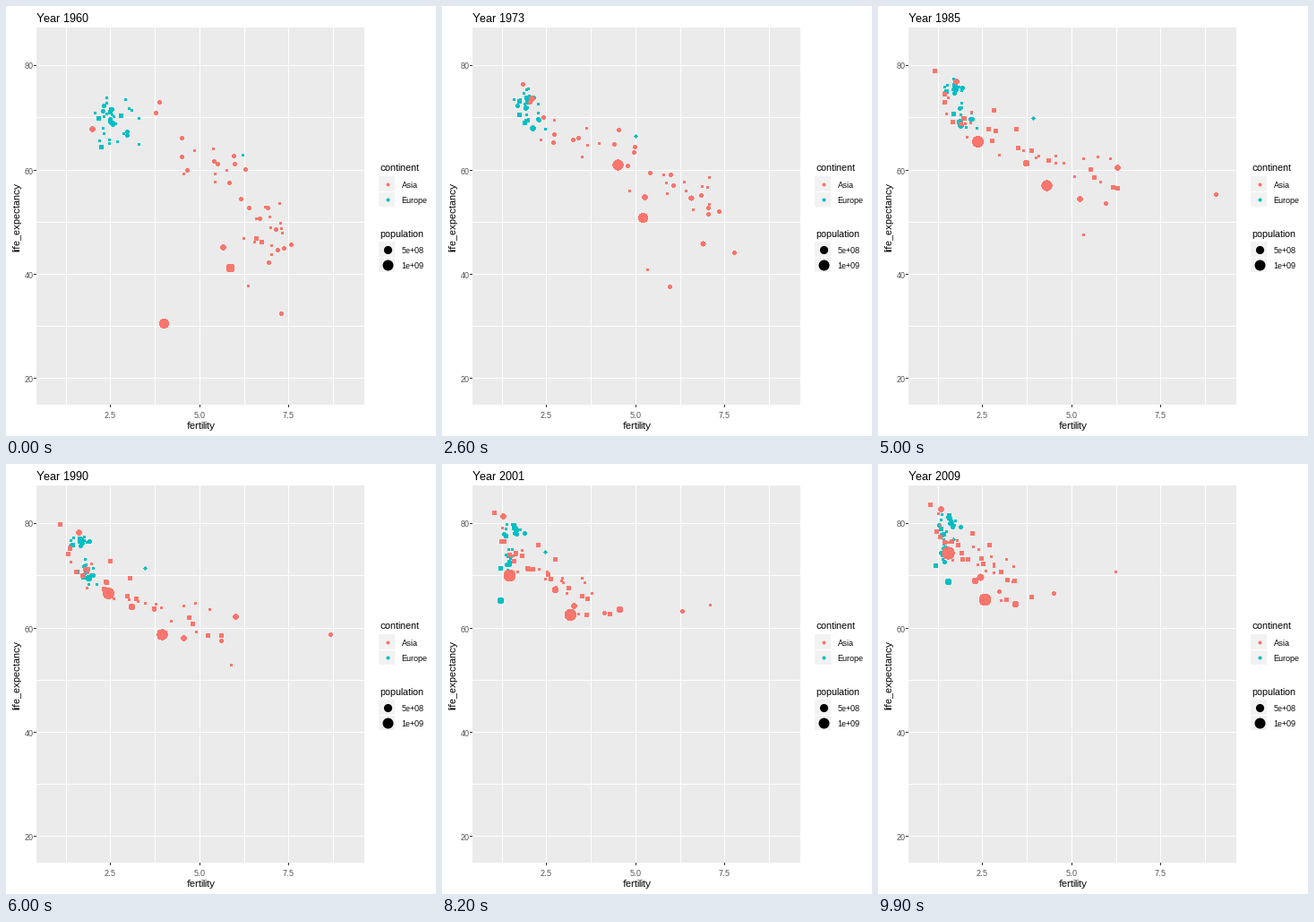
Recreate the animation shown at these times as a matplotlib script. Size 480x480 px, loop 10000 ms.

```python
import matplotlib.pyplot as plt
import numpy as np
from matplotlib.animation import FuncAnimation
from matplotlib.patches import Rectangle

SIZE, FRAMES = 480, 100
ASIA, EUROPE = "#F8766D", "#00BFC4"
T = np.arange(FRAMES)
U = T / (FRAMES - 1)

plt.rcParams.update({"font.family": "Liberation Sans", "text.hinting": "native",
                     "text.hinting_factor": 1})
rng = np.random.default_rng(7)
fig = plt.figure(figsize=(4.8, 4.8), dpi=100, facecolor="white")
ax = fig.add_axes([0, 0, 1, 1])
ax.set_xlim(-0.5, SIZE - 0.5)
ax.set_ylim(SIZE - 0.5, -0.5)
ax.axis("off")


def pt(px):
    return px * 0.72


def px_x(fertility):
    return np.floor(116.25 + 39.8 * (fertility - 2.5) + 0.5)


def px_y(life):
    return np.floor(415.4 - 5.821 * (life - 20) + 0.5)


def area(pop):
    """Marker area for a population in millions."""
    return pt(2.5 + 10.9 * np.sqrt(np.asarray(pop) / 1330)) ** 2


def text(x, y, s, px, color="black", **kw):
    return ax.text(x, y, s, fontsize=pt(px), color=color, va="baseline", **kw)


def box(x, y, w, h, color):
    ax.add_patch(Rectangle((x - 0.5, y - 0.5), w, h, fc=color, lw=0,
                           antialiased=False, zorder=0))


def dots(x, y, pop, color, z=3):
    return ax.scatter(x, y, s=area(pop), c=color, linewidths=0,
                      antialiased=False, zorder=z)


def between(start, end, share):
    return start + (end - start) * share


def logistic(mid, width):
    s = 1 / (1 + np.exp(-(T - mid) / width))
    return (s - s[0]) / (s[-1] - s[0])


tracks = {EUROPE: [], ASIA: []}


def add(color, fertility, life, pop, growth):
    pops = pop * (1 + growth * U)
    tracks[color].append((px_x(fertility), px_y(life), area(pops)))


def random_pop():
    return rng.choice([0.8, 30, 50], p=[0.6, 0.32, 0.08])


def add_asia(n):
    """Falling birth rates: the later a country turns, the poorer its start."""
    for lag in (np.arange(n) + 0.5) / n:
        f0 = 3 + 4.5 * lag ** 0.45 + rng.normal(0, 0.25)
        f1 = 1.2 + 2.2 * lag ** 1.3 + rng.uniform(-0.2, 0.6)
        l0 = 72 - 27 * lag ** 0.6 + rng.normal(0, 3.5)
        l1 = 80 - 12 * lag + rng.normal(0, 2)
        add(ASIA, between(f0, f1, logistic(8 + 55 * lag, 12)),
            between(l0, l1, U ** 0.85), random_pop(), 1)


def add_west(n):
    """Early, steady change."""
    decay = 1 - np.exp(-T / 25)
    for _ in range(n):
        f0, f1 = 2 + rng.gamma(2, 0.3), rng.normal(1.65, 0.25)
        l0, l1 = rng.normal(70.5, 1.5), rng.normal(80.5, 0.9)
        add(EUROPE, between(f0, f1, decay), between(l0, l1, U), random_pop(), 0.1)


def add_east(n):
    """Long standstill, then a sharp drop in births around 1992."""
    quick = 1 - np.exp(-T / 8)
    drop = 0.45 * quick + 0.55 * logistic(65, 6)
    rise = 0.35 * quick + 0.65 * np.clip((T - 55) / 44, 0, 1) ** 1.3
    for _ in range(n):
        f0, f1 = 2 + rng.gamma(2, 0.3), rng.normal(1.4, 0.1)
        l0, l1 = rng.normal(68, 2.3), rng.normal(75.5, 2)
        add(EUROPE, between(f0, f1, drop), between(l0, l1, rise), random_pop(), 0)


def add_path(color, pop, growth, *stops):
    """Piecewise path through (frame, fertility, life) stops."""
    f, x, y = zip(*stops)
    add(color, np.interp(T, f, x), np.interp(T, f, y), pop, growth)


add_west(18)
add_east(15)
add_asia(37)

# The largest countries and the ones that leave the crowd
add_path(EUROPE, 3, 0.5, (0, 6.2, 62.8), (99, 1.7, 77))
add_path(EUROPE, 120, 0.2, (0, 2.57, 68.9), (40, 1.87, 67.5), (60, 1.9, 69.5),
         (82, 1.21, 65.2), (99, 1.55, 68.9))
add_path(ASIA, 93, 0.35, (0, 1.98, 67.9), (26, 2.1, 73.6), (82, 1.3, 81.4), (99, 1.35, 82.8))
add_path(ASIA, 88, 1.7, (0, 5.67, 45.1), (26, 5.25, 54.8), (60, 3.1, 64), (99, 2.45, 69.8))
add_path(ASIA, 45, 2.8, (0, 6.6, 46.8), (40, 6.56, 58.7), (60, 6, 62.2), (99, 3.43, 64.6))
add_path(ASIA, 48, 2.1, (0, 6.74, 46.2), (26, 6.9, 45.9), (60, 4.55, 58), (99, 2.3, 69.1))
add_path(ASIA, 26, 0.5, (0, 6.95, 42.3), (15, 6.65, 44.2), (26, 5.97, 37.6), (34, 5.4, 18.2),
         (40, 5.68, 28.3), (46, 6.1, 52), (60, 5.6, 57.6), (99, 2.97, 67))
add_path(ASIA, 26, 0.5, (0, 7.3, 32.5), (26, 7.77, 44.2), (46, 9.2, 54), (60, 8.67, 58.7),
         (99, 4.5, 66.7))
add_path(ASIA, 0.5, 1, (0, 6.37, 37.8), (40, 4.78, 42.4), (82, 7.1, 64.4), (99, 6.23, 70.8))
add_path(ASIA, 660, 1, (0, 3.99, 30.6), (2, 3.3, 33), (6, 7.25, 51.5), (15, 6.37, 57.9),
         (26, 4.5, 61), (40, 2.3, 64), (60, 2.45, 66.7), (82, 1.47, 70), (99, 1.55, 74.3))
add_path(ASIA, 450, 1.7, (0, 5.87, 41.2), (15, 5.65, 47.3), (40, 4.67, 55.2), (99, 2.57, 65.5))

# Panel, grid and axes
box(34, 24, 366, 421, "#EBEBEB")
for f in np.arange(1.25, 9, 1.25):
    box(px_x(f), 24, 1, 421, "white")
for life in range(20, 81, 10):
    box(34, px_y(life), 366, 1, "white")
for f in (2.5, 5.0, 7.5):
    box(px_x(f), 445, 1, 3, "#333333")
    text(px_x(f), 459, f"{f:.1f}", 9, "#4D4D4D", ha="center")
for life in (20, 40, 60, 80):
    box(31, px_y(life), 3, 1, "#333333")
    text(30, px_y(life) + 4, str(life), 9, "#4D4D4D", ha="right")
text(217, 472, "fertility", 11, ha="center")
text(15, 235.5, "life_expectancy", 11, rotation=90, rotation_mode="anchor", ha="center")
title = text(34, 17, "", 13)


def legend(top, name, entries):
    text(417, top - 6, name, 11)
    box(416, top, 18, 34, "#F2F2F2")
    box(416, top + 17, 18, 1, "white")
    for k, (label, pop, color) in enumerate(entries):
        y = top + 8.5 + 17 * k
        dots([425.5], [y], [pop], color)
        text(441, y + 4, label, 9)


legend(190, "continent", [("Asia", 26, ASIA), ("Europe", 26, EUROPE)])
legend(263, "population", [("5e+08", 500, "black"), ("1e+09", 1000, "black")])

layers = []
for z, (color, rows) in enumerate(tracks.items()):
    x, y, s = (np.array(part) for part in zip(*rows))
    layers.append((dots(x[:, 0], y[:, 0], np.ones(len(x)), color, 4 + z), x, y, s))


def draw(i):
    title.set_text(f"Year {round(1960 + 49 * U[i])}")
    for layer, x, y, s in layers:
        layer.set_offsets(np.column_stack([x[:, i], y[:, i]]))
        layer.set_sizes(s[:, i])
    return [title] + [layer for layer, *_ in layers]


anim = FuncAnimation(fig, draw, frames=FRAMES, interval=100, repeat=True)
plt.show()
```
